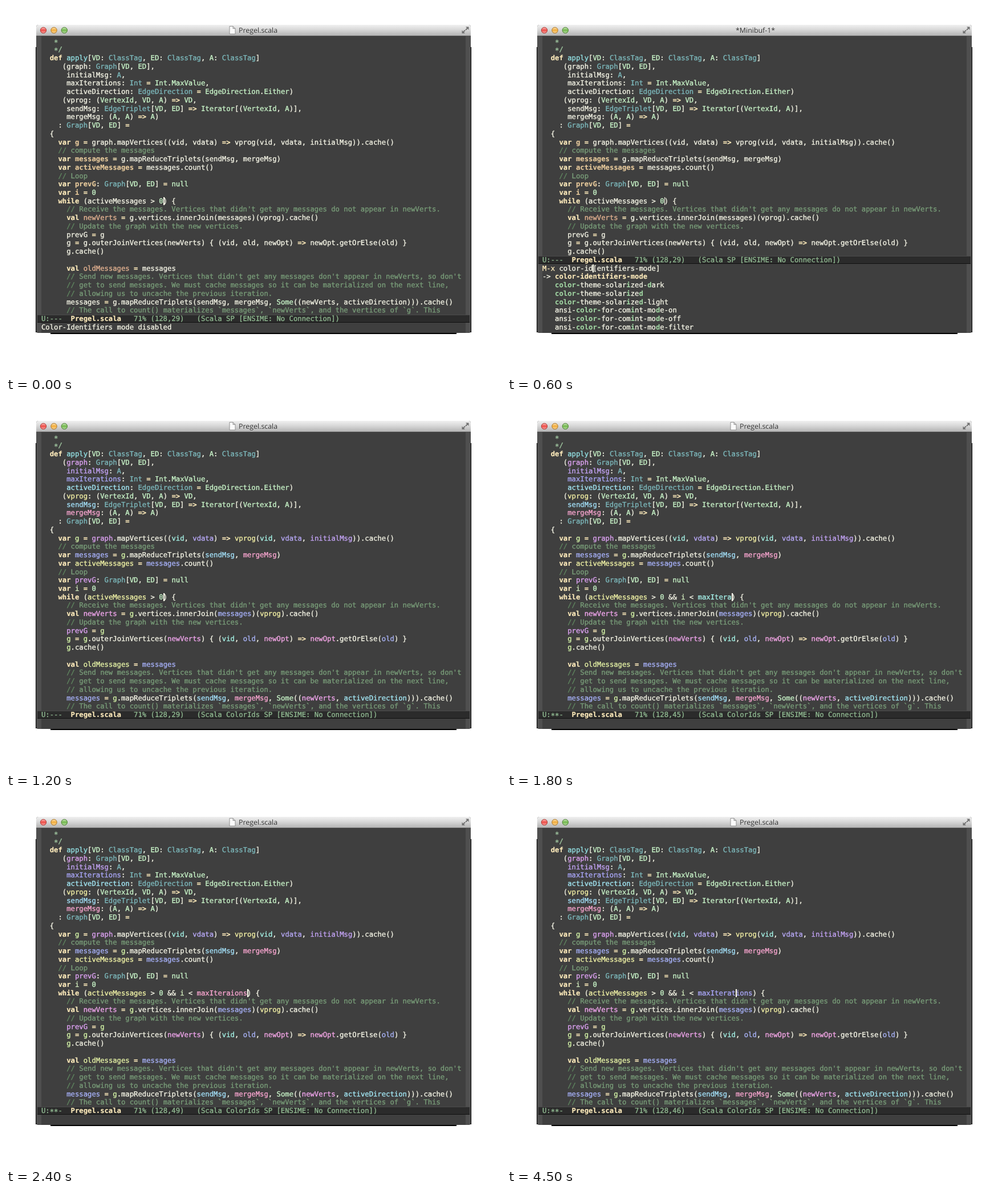
These frames come from a looping animation (868x645 px, 5.5 s). An HTML page:

```html
<!DOCTYPE html>
<html lang="en">
<head>
<meta charset="utf-8">
<title>Color identifiers</title>
<style>
html, body { margin: 0; width: 100%; height: 100%; overflow: hidden; background: #fff; }
#stage { position: relative; width: 868px; height: 645px; overflow: hidden; }
#stage div, svg { position: absolute; }
.shade { background: #000; }
#win { left: 53px; top: 33px; width: 762px; height: 540px; background: #3f3f3f; border-radius: 4px; overflow: hidden; }
.fringe { top: 20px; width: 9px; height: 520px; background: #4f4f4f; }
#bar { left: 0; top: 0; width: 762px; height: 19px; background: linear-gradient(#f0f0f0, #d8d8d8 45%, #b3b3b3); border-bottom: 1px solid #555; }
#title { left: 0; width: 868px; top: 33px; font: 12.4px/19px "Open Sans", sans-serif; color: #303030; white-space: pre; text-rendering: geometricPrecision; text-shadow: 0 1px #eee8; }
#rows { font: 12.24px/14.735px "DejaVu Sans Mono", monospace; color: #f5f5e6; text-rendering: geometricPrecision; font-variant-ligatures: none; -webkit-text-stroke: .35px currentColor; }
.row { left: 62px; height: 14.735px; white-space: pre; }
#stage .mode { left: 55px; width: 751px; padding-left: 7px; height: 14px; background: #2b2b2b; color: #8fb890; box-shadow: inset 0 1px #4b4b4b, inset 0 -1px #111; }
#cursor { width: 2px; height: 14px; background: #ffffef; }
b, .key { color: #ffecbc; font-weight: bold; }
.key, b, .var, .hit { -webkit-text-stroke-width: .15px; }
.fn { color: #93e0e3; }
.type { color: #7cb8bb; }
.const { color: #c8f4c8; }
.doc { color: #9fc59f; }
.note { color: #789c78; }
.slash { color: #5f845f; }
.star { position: relative; top: 2px; }
.var { color: #e6c99b; font-weight: bold; }
.val { color: #e3b291; }
.hit { color: #a0d5a2; font-weight: bold; }
.ask { color: #ffecbc; }
</style>
</head>
<body>
<div id="stage">
  <div class="shade" style="left:52px;top:72px;width:764px;height:500px"></div>
  <div class="shade" style="left:78px;top:572px;width:712px;height:3px"></div>
  <div id="win">
    <div class="fringe" style="left:0"></div>
    <div class="fringe" style="left:753px"></div>
    <div id="bar"></div>
  </div>
  <svg width="868" height="60">
    <defs><linearGradient id="gloss" x2="0" y2="1">
      <stop stop-color="#fff" stop-opacity=".55"/><stop offset=".5" stop-color="#fff" stop-opacity="0"/>
      <stop offset="1" stop-color="#fff" stop-opacity=".45"/>
    </linearGradient></defs>
    <g stroke-width="1">
      <circle cx="65.5" cy="42.5" r="5.2" fill="#ee4f49" stroke="#a83a36"/>
      <circle cx="84" cy="42.5" r="5.2" fill="#f3ae3c" stroke="#a8772c"/>
      <circle cx="102.3" cy="42.5" r="5.2" fill="#74b94e" stroke="#4c7e35"/>
    </g>
    <g fill="url(#gloss)">
      <circle cx="65.5" cy="42.5" r="4.7"/><circle cx="84" cy="42.5" r="4.7"/><circle cx="102.3" cy="42.5" r="4.7"/>
    </g>
    <path id="page" d="M392 35.5h6l4 4v9.5h-10zM398 35.5v4h4" fill="#fafafa" stroke="#8a8a8a" stroke-width=".9"/>
    <path d="M806 36.5h5.5v5.5zM799.5 42.5v5.5h5.5z" fill="#727272"/>
    <path d="M806 42l3.5-3.5M801.5 46l3.5-3.5" stroke="#727272" stroke-width="1.8"/>
  </svg>
  <div id="title"></div>
  <div id="rows"></div>
  <div id="cursor"></div>
</div>
<script>
const X = 62, Y = 54.75, CELL = 7.37, LINE = 14.735;
const $ = id => document.getElementById(id);

const code = `   *
   */
  def apply[VD: ClassTag, ED: ClassTag, A: ClassTag]
     (graph: Graph[VD, ED],
      initialMsg: A,
      maxIterations: Int = Int.MaxValue,
      activeDirection: EdgeDirection = EdgeDirection.Either)
     (vprog: (VertexId, VD, A) => VD,
      sendMsg: EdgeTriplet[VD, ED] => Iterator[(VertexId, A)],
      mergeMsg: (A, A) => A)
    : Graph[VD, ED] =
  {
    var g = graph.mapVertices((vid, vdata) => vprog(vid, vdata, initialMsg)).cache()
    // compute the messages
    var messages = g.mapReduceTriplets(sendMsg, mergeMsg)
    var activeMessages = messages.count()
    // Loop
    var prevG: Graph[VD, ED] = null
    var i = 0
    while (activeMessages > 0@) {
      // Receive the messages. Vertices that didn't get any messages do not appear in newVerts.
      val newVerts = g.vertices.innerJoin(messages)(vprog).cache()
      // Update the graph with the new vertices.
      prevG = g
      g = g.outerJoinVertices(newVerts) { (vid, old, newOpt) => newOpt.getOrElse(old) }
      g.cache()

      val oldMessages = messages
      // Send new messages. Vertices that didn't get any messages don't appear in newVerts, so don't
      // get to send messages. We must cache messages so it can be materialized on the next line,
      // allowing us to uncache the previous iteration.
      messages = g.mapReduceTriplets(sendMsg, mergeMsg, Some((newVerts, activeDirection))).cache()
      // The call to count() materializes \`messages\`, \`newVerts\`, and the vertices of \`g\`. This`.split("\n");

const idColors = {
  graph: "#dda2f2", initialMsg: "#c3a3f5", maxIterations: "#a9a6f7", activeDirection: "#a3e8f5",
  vprog: "#f3f0a5", sendMsg: "#a3e0f8", mergeMsg: "#f8a5cf", g: "#d5f5a8", vid: "#a5f3e6",
  vdata: "#b7a8f6", messages: "#a6b0f7", activeMessages: "#f1f3a6", prevG: "#dfa3f5", i: "#d5f0c0",
  newVerts: "#f0a5ec", old: "#a8b2f5", newOpt: "#f4a6e6", oldMessages: "#e6f3a6",
  maxItera: "#a5f0e8", maxIteraions: "#f8a5cf"
};

// Brackets around a run of letters mark the matched part of a completion.
const choices = [
  "[color-]theme-solar[i]zed-[d]ark", "[color-]theme-solar[i]ze[d]", "[color-]theme-solar[i]ze[d]-light",
  "ansi-[color-]for-com[i]nt-mo[d]e-on", "ansi-[color-]for-com[i]nt-mo[d]e-off",
  "ansi-[color-]for-com[i]nt-mo[d]e-filter"
].map(s => "   " + s.replace(/\[(.*?)\]/g, (_, m) => span("hit", m)));
const prompt = [
  span("ask", "M-x ") + "color-id[entifiers-mode]", "-&gt; <b>color-identifiers-mode</b>", ...choices
];

const states = [
  { at: 0, col: 29, echo: ["Color-Identifiers mode disabled"] },
  { at: 600, col: 29, echo: prompt, asking: true },
  { at: 1200, col: 29, ids: true },
  { at: 1800, col: 45, ids: true, typed: "maxItera" },
  { at: 2400, col: 49, ids: true, typed: "maxIteraions" },
  { at: 3000, col: 46, ids: true, typed: "maxIterations" }
];

function span(cls, text) { return `<span class="${cls}">${text}</span>`; }
function escape(s) { return s.replace(/&/g, "&amp;").replace(/</g, "&lt;").replace(/>/g, "&gt;"); }

// Asterisks sit at mid height in the editor.
function lowerStars(s) { return s.replace(/\*+/, m => span("star", m)); }

function paint(line, ids) {
  const note = line.match(/^( *)\/\/ (.*)/);
  if (note) return note[1] + span("slash", "// ") + span("note", note[2]);
  if (/^ *\*/.test(line)) return span("doc", lowerStars(line));
  let last = "";
  return line.replace(/\w+|=>|\W/g, (word, pos) => {
    const before = last, text = escape(word);
    if (word.trim()) last = word;
    if (/^(def|var|val|while|=>|=)$/.test(word)) return span("key", text);
    if (ids && Object.hasOwn(idColors, word)) return `<span style="color:${idColors[word]}">${text}</span>`;
    if (before == "var" || before == "val") return word.trim() ? span(before, text) : text;
    if (before == "def" && word.trim()) return span("fn", text);
    if (/^[A-Z]/.test(word)) return span(line.slice(0, pos).endsWith(": ") ? "type" : "const", text);
    return /^(null|0)$/.test(word) ? span("const", text) : text;
  });
}

function row(n, html, cls = "") {
  return `<div class="row ${cls}" style="top:${Y + n * LINE}px">${html}</div>`;
}

function show({ col, ids, typed, asking, echo = [] }) {
  const modeRow = asking ? 26 : 33;
  const cond = typed ? " && i < " + typed : "";
  const mode = `U:${typed ? lowerStars("**-") : "---"}  <b>Pregel.scala</b>   71% (128,${col})   ` +
    `(Scala ${ids ? "ColorIds " : ""}SP [ENSIME: No Connection])`;
  $("rows").innerHTML =
    code.slice(0, modeRow).map((s, n) => row(n, paint(s.replace("0@", "0" + cond), ids))).join("") +
    row(modeRow, mode, "mode") +
    echo.map((s, n) => row(modeRow + 1 + n, s)).join("");

  $("title").textContent = asking ? "*Minibuf-1*" : "Pregel.scala";
  $("title").style.left = (asking ? 401 : 408) + "px";
  $("page").style.display = asking ? "none" : "";

  placeCursor(col, 19);
  if (asking) addPromptCursor();
}

function placeCursor(col, line) {
  const c = $("cursor").style;
  c.left = X + col * CELL + "px";
  c.top = Y + line * LINE + "px";
}

// The code keeps a thin caret while the prompt has the main one.
function addPromptCursor() {
  $("rows").insertAdjacentHTML("beforeend",
    `<div style="left:${X + 29 * CELL}px;top:${Y + 19 * LINE}px;width:1px;height:14px;background:#ffffef"></div>`);
  placeCursor(12, 27);
}

let current;
function tick(now) {
  const t = now % 5500;
  const next = states.findLast(s => t >= s.at);
  if (next != current) show(current = next);
  requestAnimationFrame(tick);
}
tick(performance.now());
</script>
</body>
</html>
```
